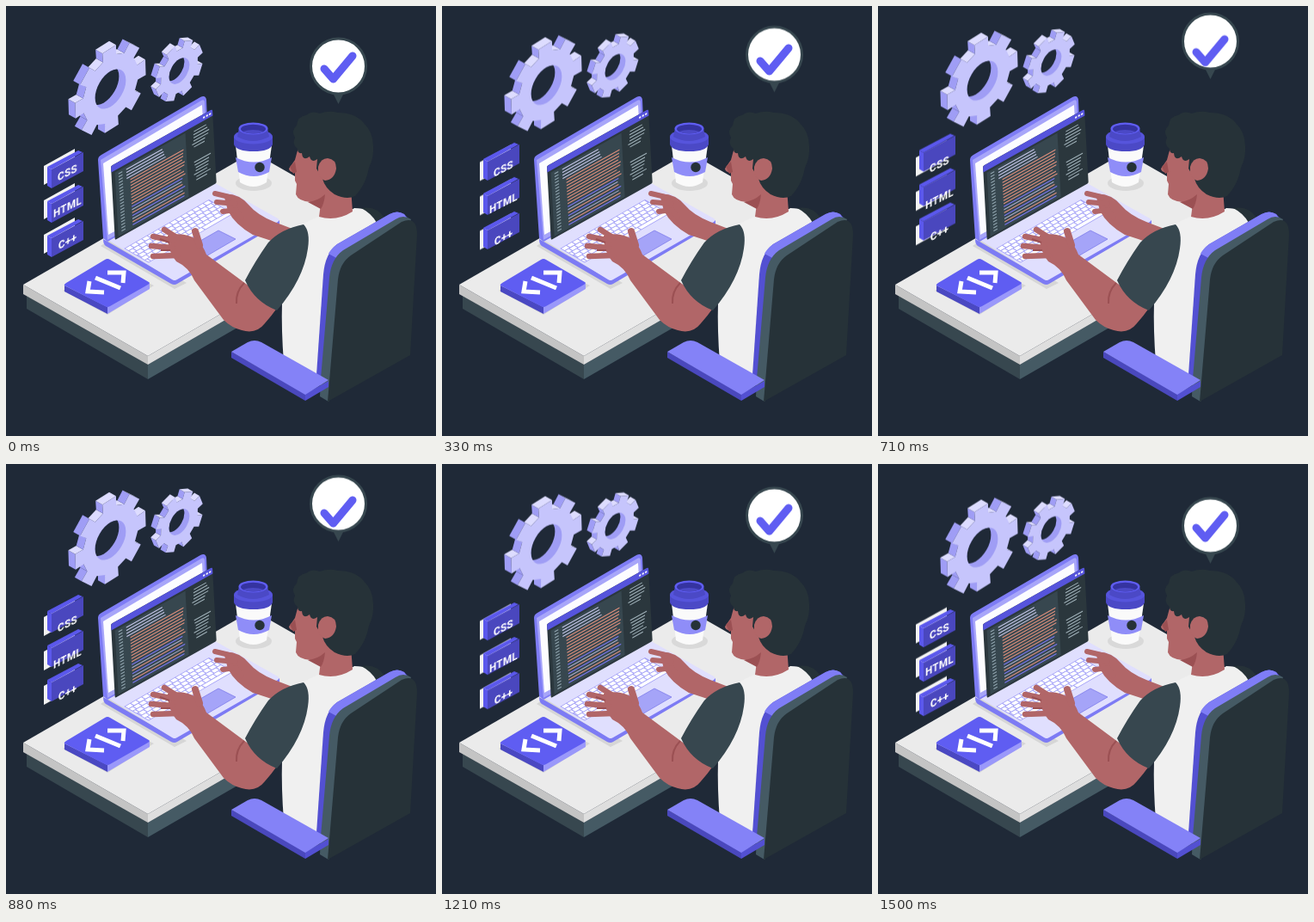
Write an HTML page that moves like this. It is 500 px wide and 500 px high and loops after 1540 ms.

```html
<!DOCTYPE html>
<html lang="en">
<head>
<meta charset="utf-8">
<title>Developer at work</title>
<style>
  html, body { margin: 0; width: 100%; height: 100%; overflow: hidden; background: #1f2937; }
  svg { display: block; width: 100vw; height: 100vh; }
  .float { animation: float 1540ms -4ms infinite; }
  .slow { --a: .57px; }
  .mid { --a: 1.14px; }
  .fast { --a: 1.7px; }
  .tag { font: 700 13.5px Roboto, Inter, sans-serif; fill: #fff; letter-spacing: .3px; text-anchor: middle; }
  /* 24 pictures per second: 18 steps up, 19 down */
  @keyframes float {
    0% { transform: translateY(0); animation-timing-function: steps(18); }
    48.64% { transform: translateY(calc(var(--a) * -18)); }
    48.65% { transform: translateY(calc(var(--a) * -17)); animation-timing-function: steps(19); }
    100% { transform: translateY(calc(var(--a) * 2)); }
  }
</style>
</head>
<body>
<svg viewBox="0 0 500 500">
  <g id="gears" class="float slow"></g>
  <g id="tags"></g>

  <g id="desk">
    <path fill="#37474f" d="M24 337L165 417V434L24 352Z"/>
    <path fill="#455a64" d="M165 417L432 263V280L165 434Z"/>
    <path fill="#c4c4c4" d="M20 324L165 407V417L20 335Z"/>
    <path fill="#dedede" d="M165 407L432 253V263L165 417Z"/>
    <path fill="#ebebeb" d="M20 324L287 170L432 253L165 407Z"/>
  </g>

  <g id="tile">
    <path fill="#d6d6d6" d="M66 331L118 300L172 325L118 359Z"/>
    <path fill="#4a48c2" d="M68 325L118 350V358L68 332Z"/>
    <path fill="#9a98fa" d="M118 350L167 322V329L118 358Z"/>
    <path fill="#5f5df2" d="M68 325Q67 324 70 322L115 295Q118 293 121 295L166 321Q168 322 165 324L121 349Q118 351 115 349Z"/>
    <path fill="none" stroke="#fff" stroke-width="5" d="M97 320L95 332L114 333M118 310L137 310L136 322M104 316L133 328"/>
  </g>

  <g id="cup">
    <ellipse cx="288" cy="206" rx="21" ry="9" fill="#d9d9d9"/>
    <path fill="#fafafa" d="M267 162L272 205Q288 215 303 205L309 162Z"/>
    <path fill="#8f8df8" d="M267 176Q288 187 309 176L306 193Q288 203 270 193Z"/>
    <circle cx="295" cy="187.500" r="5.700" fill="#263238"/>
    <path fill="#4b49c6" d="M265 152V161Q268 169 288 169Q307 169 310 161V152Z"/>
    <ellipse cx="287.500" cy="152" rx="22.500" ry="8.500" fill="#5654dc"/>
    <path fill="#4b49c6" d="M271 142L269 152Q287 162 306 152L304 142Z"/>
    <ellipse cx="287.500" cy="142.500" rx="17" ry="7" fill="#5f5df2"/>
    <ellipse cx="287.500" cy="143" rx="14.500" ry="5.300" fill="#3533a0"/>
    <path fill="#4b49c6" d="M275 146Q287 142 300 146Q288 151 275 146Z"/>
  </g>

  <g id="laptop">
    <path fill="#d6d6d6" d="M110 279L196 329L210 322L122 271Z"/>
    <path fill="#7d7bf4" d="M113 271L196 319L318 249V253L199 323Q196 325 192 323L116 279Q113 277 113 271Z"/>
    <path fill="#e0dffe" d="M115 270L236 202L316 247Q319 249 316 251L199 318Q196 320 193 318Z"/>
    <path fill="#7e7cf5" d="M107 179Q107 175 111 173L226 106Q232 103 233 109L237 207L118 274L113 270Z"/>
    <path fill="#a7a5f9" d="M110 179L227 110Q231 108 231 112L236 206L118 272Z"/>
    <path fill="#fcfcff" d="M113 183L228 115L233 203L119 266Z"/>
    <g id="screen" transform="matrix(1 -.56 .055 1 122 186)">
      <rect width="118" height="86" rx="1.500" fill="#2b373d"/>
      <path fill="#5654dc" d="M0 7.500V2Q0 0 2 0H116Q118 0 118 2V7.500Z"/>
      <path fill="#fff" d="M107 3h2v2h-2zM110.500 3h2v2h-2zM114 3h2v2h-2z"/>
      <rect x="4" y="10" width="82" height="74" fill="#37474f"/>
    </g>
    <g id="keys" transform="matrix(.866 -.5 .866 .5 139 282)">
      <rect x="-1" y="-1" width="114" height="33" fill="#a3a1f7"/>
    </g>
    <path fill="#a5a4f8" stroke="#7674ea" stroke-width=".7" d="M212 281L247 261L267 271L231 292Z"/>
  </g>

  <g id="man">
    <g fill="#b16668" stroke="#b16668" stroke-linecap="round" stroke-linejoin="round">
      <path stroke="none" d="M253 219Q270 217 282 231Q292 243 312 251L338 261L320 277Q300 270 287 266Q266 254 258 238Z"/>
      <path fill="none" stroke-width="6" d="M264 223L243 218M267 230L245 228M268 237L252 239M274 246L268 238"/>
    </g>
    <path fill="#f0f0f0" d="M340 256L363 245Q384 252 405 235Q425 235 433 246L405 300L375 445L323 415Q320 375 321 345Z"/>
    <path fill="#263238" d="M413 235Q432 232 441 248L431 252Q425 241 413 235Z"/>
    <path fill="#b16668" d="M342 160Q338 170 336 179L329 189Q329 193 336 194L336 203L338 207L337 219Q340 227 354 228L366 230L364 245Q384 251 403 239L401 212L374 155Z"/>
    <path fill="#9b5053" d="M330 187L336 181L338 193L334 195Z"/>
    <path fill="#9b5053" d="M351 228Q362 227 371 219Q370 230 366 236Z"/>
    <path fill="#263238" d="M339 166Q332 161 336 153Q331 145 338 139Q339 128 349 127Q356 121 365 125Q375 121 386 124Q406 124 416 136Q427 147 427 163Q428 176 422 188Q419 207 406 221Q396 226 382 219Q371 212 368 201L361 189L362 178Q355 183 353 175Q345 181 344 171Q339 172 339 166Z"/>
    <path fill="#b16668" d="M363 187Q366 177 374 177Q384 178 384 189Q382 202 371 203Q365 201 363 194Z"/>
    <g fill="#b16668" stroke="#b16668" stroke-linecap="round" stroke-linejoin="round">
      <path stroke="none" d="M188 267Q208 262 222 272Q229 278 233 289L283 326L316 350Q309 360 301 369Q291 382 274 377Q262 374 253 365L219 319Q213 304 198 297Q188 286 188 267Z"/>
      <path fill="none" stroke-width="6.500" d="M200 270L184 260M195 273L171 268M194 281L169 279M199 290L171 291"/>
      <path fill="none" stroke-width="8" d="M225 278L220 262"/>
    </g>
    <path fill="none" stroke="#9b5053" stroke-width="2" d="M277 322Q267 332 268 346M190 275L179 271M191 284L180 284"/>
    <path fill="#37474f" d="M346 254Q320 259 305 275Q290 296 278 319Q289 344 315 354Q346 318 351 282Q354 262 346 254Z"/>
  </g>

  <g id="chair">
    <path fill="#5350d2" d="M361 429L369 312Q371 288 385 277L446 242Q455 237 463 242L476 256L400 440Z"/>
    <path fill="#7f7df6" d="M375 288Q378 282 385 277L446 242Q455 237 463 242L467 248L386 294Z"/>
    <path fill="#455a64" d="M366 433L376 316Q378 294 392 284L453 248Q462 242 471 248L460 280L375 460L365 454Z"/>
    <path fill="#263238" d="M374 460L386 318Q388 299 401 290L460 251Q478 243 478 266L470 406Z"/>
    <path fill="#4a48bd" d="M262 402L348 451V459L262 409Z"/>
    <path fill="#5350d2" d="M348 451L375 436V443L348 459Z"/>
    <path fill="#8482f7" d="M262 402L281 391Q289 387 297 391L375 435L348 452Z"/>
  </g>

  <g class="float fast">
    <path fill="#37474f" d="M379 99L386.500 114L394 99Z"/>
    <circle cx="386.500" cy="70" r="32" fill="#fff" stroke="#37474f" stroke-width="3"/>
  </g>
  <path class="float mid" fill="none" stroke="#5f5df2" stroke-width="9" stroke-linecap="round" stroke-linejoin="round" d="M370 73L380.500 85L403 58"/>
</svg>
<script>
  const add = (id, markup) => document.getElementById(id).insertAdjacentHTML('beforeend', markup);

  // Toothed wheel on an upright isometric plane, extruded by (ox, oy)
  function gear(name, cx, cy, R, turn, ox, oy) {
    const pts = [];
    for (let i = 0; i < 8; i++)
      for (const [k, d] of [[.78, -13.5], [1, -11], [1, 11], [.78, 13.5]]) {
        const a = (i * 45 + turn + d) * Math.PI / 180;
        const x = R * k * Math.cos(a), y = R * k * Math.sin(a);
        pts.push([cx + x * .866, cy + y - x * .5]);
      }
    let out = '';
    pts.forEach(([x, y], i) => {
      const [u, v] = pts[(i + 1) % pts.length];
      const nx = v - y, ny = x - u;
      if (nx * ox + ny * oy <= 0) return;
      const fill = ny < -Math.abs(nx) * .6 ? '#dddcff' : '#9f9df5';
      out += `<path fill="${fill}" d="M${x} ${y}L${u} ${v}l${ox} ${oy}L${x + ox} ${y + oy}Z"/>`;
    });
    const hole = (x, y) => `<circle r="${R * .43}" transform="matrix(.866 -.5 0 1 ${x} ${y})"`;
    return out + `<path fill="#c6c5fc" d="M${pts.join('L')}Z"/>
      <clipPath id="${name}">${hole(cx, cy)}/></clipPath>
      ${hole(cx, cy)} fill="#9f9df5"/>
      <g clip-path="url(#${name})">${hole(cx + ox, cy + oy)} fill="#1f2937"/></g>`;
  }
  add('gears', gear('big', 121.5, 96.5, 48, -2, -8, -4.5) + gear('small', 201.5, 75.5, 32, 24, -6, -3.5));

  ['CSS', 'HTML', 'C++'].forEach((word, i) => add('tags', `<g transform="translate(0 ${i * 40})">
    <path class="float slow" fill="#f2f2f2" d="M44 186L80 166V188L44 208Z"/>
    <g class="float mid">
      <path fill="#5b58ec" d="M48 187L53 190V212L48 209Z"/>
      <path fill="#5b58ec" d="M48 187L84 168L89 170L53 190Z"/>
      <path fill="#4a47be" d="M53 190L90 170V192L53 212Z"/>
    </g>
    <g class="float slow"><text class="tag" transform="matrix(.87 -.44 0 1 71.500 198)">${word}</text></g>
  </g>`));

  let seed = 7;
  const rnd = () => (seed = seed * 16807 % 2147483647) / 2147483647;
  const bar = (x, y, w, color) => `<rect x="${x}" y="${y}" width="${w}" height="1.2" fill="${color}"/>`;
  let code = '';
  for (let i = 0; i < 20; i++) {
    const y = 13 + i * 3.5;
    const color = i < 4 ? '#c3c5e6' : i < 12 || i % 3 == 0 ? '#dd8f7c' : i % 3 == 1 ? '#7876f0' : '#a9acc8';
    code += bar(8, y, 4.5, '#90a4ae') + bar(i < 4 ? 17 : 21, y, (i < 4 ? 42 : 57) + rnd() * 6, color);
    if (i < 6 || (i > 9 && i < 17)) code += bar(92 + rnd() * 4, y, 12 + rnd() * 8, '#9fb0b8');
  }
  add('screen', code);

  let keys = '';
  for (let r = 0; r < 6; r++)
    keys += `<path stroke="#fff" stroke-width="4.300" stroke-dasharray="${r == 5 ? '12 1.2 9 1.2 38 1.2' : '6.3 1.2'}" stroke-dashoffset="${r * 2}" d="M0 ${2 + r * 5.4}H112"/>`;
  add('keys', keys);
</script>
</body>
</html>
```
